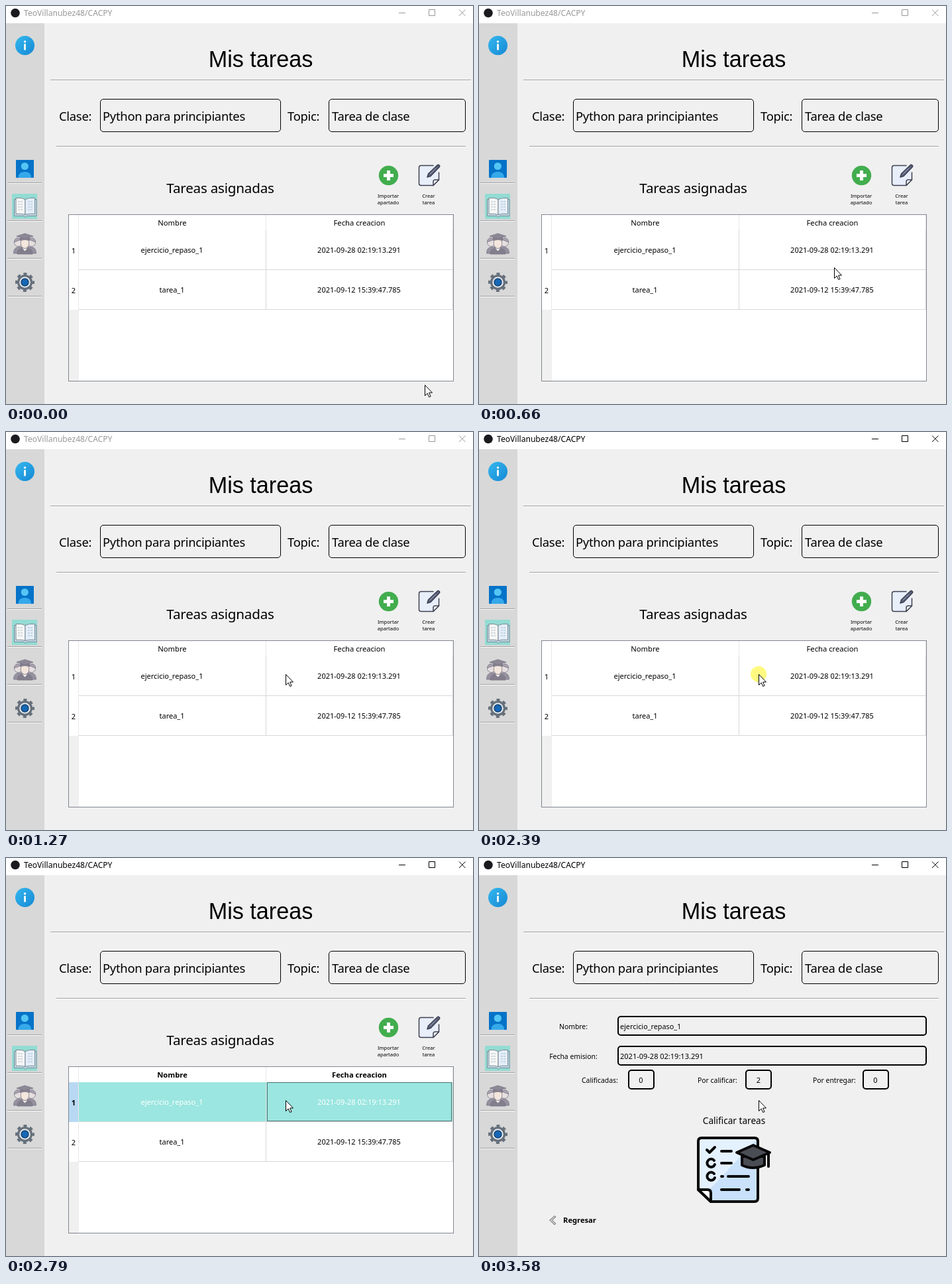
Recreate the animation shown at these times as an HTML page. Size 705 by 600 pixels, loop 8000 ms.

```html
<!DOCTYPE html>
<html lang="es">
<head>
<meta charset="utf-8">
<title>Mis tareas</title>
<style>
  html, body { margin: 0; width: 100%; height: 100%; overflow: hidden; background: #f0f0f0; }
  svg { display: block; width: 100%; height: 100%; }
  text { font: 11px "Noto Sans", "Open Sans", sans-serif; fill: #000; white-space: pre; }
  .mid { text-anchor: middle; }
  #stage .title { font: 34.2px "Liberation Sans", Arial, sans-serif; }
  #stage .field { font-size: 18.4px; letter-spacing: -.015em; }
  #stage .heading { font-size: 20.6px; letter-spacing: -.01em; }
  #stage .tiny { font-size: 7.6px; }
  #stage .label { font-size: 10.4px; }
  #stage .value { font-size: 10.8px; }
  #stage .caption { font-size: 13.6px; }
  #stage .bold { font-weight: 700; font-size: 11.2px; }
  #bar { color: #999; }
  #bar.active { color: #000; }
  #bar text { font-size: 12.1px; fill: currentColor; }
  #table .head { font-size: 11.2px; }
  #table.selected .head { font-weight: 700; }
  #table.selected .row1 { fill: #fff; }
  #table:not(.selected) .selection { display: none; }
  .line { fill: none; stroke: #000; }
  .ink { stroke: #3e4152; stroke-width: 1.5; stroke-linejoin: round; stroke-linecap: round; }
  .thick { stroke: #080808; stroke-width: 4; stroke-linejoin: round; stroke-linecap: round; }
</style>
</head>
<body>
<svg id="stage" viewBox="0 0 705 600">
  <defs>
    <linearGradient id="sky" x2="1" y2="1"><stop stop-color="#35b8ee"/><stop offset="1" stop-color="#1688d4"/></linearGradient>
    <linearGradient id="paper" x2="1" y2="1"><stop offset=".5" stop-color="#e4f1ff"/><stop offset=".5" stop-color="#c9e1fa"/></linearGradient>
    <!-- Sunken separators: a dark line with a light one below -->
    <path id="rules" d="M2 266.5h52M2 323.5h52M2 380.5h52M2 437.5h52M67 111.5h635M76 211.5h618"/>
  </defs>

  <rect width="705" height="600" fill="#f0f0f0"/>
  <rect width="705" height="26" fill="#fff"/>
  <rect y="26" width="58" height="574" fill="#d8d8d8"/>
  <use href="#rules" y="1" stroke="#fff"/>
  <use href="#rules" stroke="#a0a0a0"/>

  <g id="bar">
    <circle cx="14" cy="10.5" r="6.8" fill="#1b1b1f"/>
    <text x="27" y="15">TeoVillanubez48/CACPY</text>
    <path d="M593 10.5h10M638.5 5.5h9v9h-9zM684 5.5l9.5 9.5M693.5 5.5l-9.5 9.5" fill="none" stroke="currentColor"/>
  </g>

  <!-- Sidebar -->
  <circle cx="28.5" cy="59.5" r="14.5" fill="url(#sky)"/>
  <circle cx="28.5" cy="53.7" r="1.7" fill="#fff"/>
  <rect x="27.1" y="57" width="2.8" height="9.5" rx="1" fill="#fff"/>

  <rect x="15" y="232" width="27" height="27" rx="1" fill="#0673c8"/>
  <circle cx="28.3" cy="241.5" r="5.6" fill="#55c5f4"/>
  <path d="M18.5 259c0-6 3.5-9 9.8-9s9.8 3 9.8 9z" fill="#35a9ea"/>

  <rect x="9" y="283" width="38" height="38" fill="#93dcd3"/>
  <g stroke="#6f808c" stroke-width=".9">
    <path d="M12.5 291.5h33.5v25h-14.5l-2.3 2-2.3-2h-14.4z" fill="#c3d9e6"/>
    <path d="M15 289.5q9-1 14 2v23q-6-2-14-1z" fill="#f6f7f6"/>
    <path d="M43.500 289.5q-9-1-14.500 2v23q6-2 14.500-1z" fill="#e3eefa"/>
    <path d="M18 295h7M18 299h7M18 303h7M18 307h7M33 295h7M33 299h7M33 303h7M33 307h7" fill="none" stroke="#a9b8c4" stroke-dasharray="3 1"/>
  </g>

  <g stroke="#7c7688" stroke-width=".8">
    <path d="M11.5 373c0-7 3-9 8-10h18c5 1 8 3 8 10z" fill="#96919f"/>
    <circle cx="18.5" cy="356.5" r="6" fill="#e6dfdf"/>
    <circle cx="38.5" cy="356.5" r="6" fill="#e6dfdf"/>
    <path d="M12.5 356q0-6 6-6.500l3 3zM44.500 356q0-6-6-6.500l-3 3z" fill="#aaa3b0"/>
    <path d="M17 374c0-7 4-9 11.5-9s11.5 2 11.5 9z" fill="#837e8c"/>
    <path d="M24 365l4.5 5 4.5-5z" fill="#f4f1ee"/>
    <ellipse cx="28.5" cy="357.5" rx="6.3" ry="8" fill="#f3e6dc"/>
    <path d="M21.500 353.500v-5h14v5q-7-2.500-14 0z" fill="#837e8c"/>
    <path d="M16 347l12.500-4 12.500 4-12.500 4z" fill="#8d8896"/>
  </g>

  <g transform="translate(28.5 416.5)">
    <circle r="11.7" fill="none" stroke="#66707b" stroke-width="5.6" stroke-dasharray="4.595 4.595" stroke-dashoffset="2.3"/>
    <circle r="11.5" fill="#66707b"/>
    <circle r="8.3" fill="#e6ebf0"/>
    <circle r="5.5" fill="#1767b5" stroke="#12406f" stroke-width="1.4"/>
  </g>

  <!-- Page header -->
  <text class="title mid" x="384.5" y="92">Mis tareas</text>
  <rect class="line" x="142.5" y="140.5" width="272" height="49" rx="4.5"/>
  <rect class="line" x="487.5" y="140.5" width="206" height="49" rx="4.5"/>
  <text class="field" x="80" y="173">Clase:</text>
  <text class="field" x="146" y="173">Python para principiantes</text>
  <text class="field" x="425" y="173">Topic:</text>
  <text class="field" x="492" y="173">Tarea de clase</text>

  <!-- Task list -->
  <g id="list">
    <text class="heading mid" x="323.5" y="282">Tareas asignadas</text>
    <circle cx="577.5" cy="255.5" r="14.7" fill="#42ad4e"/>
    <path d="M570 255.5h15M577.5 248v15" stroke="#fff" stroke-width="5"/>
    <text class="tiny mid" x="577" y="289">Importar</text>
    <text class="tiny mid" x="577" y="299">apartado</text>

    <path class="ink" d="M645 240.500h-18.500q-3 0-3 3v24q0 3 3 3h18.500l8.500-8.500v-11" fill="#e9eefb"/>
    <path class="ink" d="M645 270.500v-5.500q0-3 3-3h5.500z" fill="#fff"/>
    <path class="ink" d="M636 258l1.500-5 13.500-13q1.500-1.500 3 0t0 3l-13 13.500z" fill="#5c627a"/>
    <path d="M640 253.500l9-9" stroke="#a9b4d0"/>
    <text class="tiny mid" x="638" y="289">Crear</text>
    <text class="tiny mid" x="638" y="299">tarea</text>

    <g id="table">
      <rect x="94.5" y="314.5" width="581" height="251" fill="#fff" stroke="#828790"/>
      <rect x="95" y="458" width="15" height="107" fill="#f0f0f0"/>
      <g class="selection">
        <rect x="95" y="338" width="14" height="60" fill="#b9d9f3"/>
        <rect x="110" y="338" width="564" height="59" fill="#9be6e0"/>
      </g>
      <path d="M109.5 315v143M392.5 315v23M674.5 315v23" stroke="#e8e8e8"/>
      <path d="M392.5 338v120M674.5 338v120M110 397.5h565M110 457.5h565" stroke="#d8d8d8"/>
      <rect class="selection line" x="394.5" y="338.5" width="278" height="58" stroke-dasharray="1 1"/>
      <text class="head mid" x="251" y="331">Nombre</text>
      <text class="head mid" x="533.5" y="331">Fecha creacion</text>
      <text class="head mid" x="102" y="373">1</text>
      <text class="mid" x="102" y="433">2</text>
      <text class="row1 mid" x="250.5" y="372">ejercicio_repaso_1</text>
      <text class="row1 mid" x="533" y="372">2021-09-28 02:19:13.291</text>
      <text class="mid" x="250.5" y="432">tarea_1</text>
      <text class="mid" x="533" y="432">2021-09-12 15:39:47.785</text>
    </g>
  </g>

  <!-- Task detail -->
  <g id="detail">
    <g class="line" stroke-width="2">
      <rect x="210" y="239" width="465" height="28" rx="4"/>
      <rect x="210" y="284" width="465" height="28" rx="4"/>
      <rect x="226" y="320" width="38" height="28" rx="4"/>
      <rect x="403" y="320" width="38" height="28" rx="4"/>
      <rect x="580" y="320" width="38" height="28" rx="4"/>
    </g>
    <text class="label mid" x="142.5" y="258">Nombre:</text>
    <text class="label mid" x="142.5" y="303">Fecha emision:</text>
    <text class="value" x="213" y="258">ejercicio_repaso_1</text>
    <text x="213" y="303">2021-09-28 02:19:13.291</text>
    <text class="label" x="155" y="339">Calificadas:</text>
    <text class="label" x="330" y="339">Por calificar:</text>
    <text class="label" x="504" y="339">Por entregar:</text>
    <text class="mid" x="244.5" y="339">0</text>
    <text class="mid" x="422" y="339">2</text>
    <text class="mid" x="598.5" y="339">0</text>
    <text class="caption mid" x="385" y="401">Calificar tareas</text>

    <path class="thick" d="M336 422h80q5 0 5 5v86q0 5-5 5h-66l-19-18v-73q0-5 5-5z" fill="url(#paper)"/>
    <path class="thick" d="M331 500h14q5 0 5 5v13z" fill="#fff"/>
    <path class="thick" d="M344 440l4 4 8-8M366 442h15M366 460h15M366 480h2M376 480h31M366 500h27M404 500h3" fill="none"/>
    <path class="thick" d="M355 456a6 6 0 1 0 1 6M355 476a6 6 0 1 0 1 6" fill="none"/>
    <path class="thick" d="M397 450v13q16 8 34 0v-13z" fill="#4b4d55"/>
    <path class="thick" d="M389 444l25-11 25 11-25 11z" fill="#4b4d55"/>
    <path class="thick" d="M437 446v19"/>

    <rect id="frame" x="94.5" y="526.5" width="119" height="39" fill="none" stroke="#d5d5d5"/>
    <path d="M114 539.5l2 1.5-5.5 5 5.5 5-2 2-7.5-7z" fill="#c5c5c5" stroke="#777"/>
    <text class="bold" x="127" y="550">Regresar</text>
  </g>

  <circle id="click" cx="422" cy="365" r="12" fill="#fff600" fill-opacity=".5"/>
  <path id="pointer" d="M.5.5v16l3.7-3.5 2.5 5.5 2.4-1-2.5-5.500h4.900z" fill="#fff" stroke="#000"/>
</svg>
<script>
  const LOOP = 8000;
  const flick = [[0, 632, 571], [200, 598, 507], [260, 558, 430], [330, 539, 396]];
  const glide = { start: 660, end: 1270, steps: 9, from: [536, 394], to: [422, 365] };
  const el = id => document.getElementById(id);
  const show = (id, on) => el(id).style.display = on ? "" : "none";
  const within = (t, a, b) => t >= a && t < b;

  function pointerAt(t) {
    if (t < glide.start) return flick.findLast(([time]) => t >= time).slice(1);
    // The pointer advances in discrete steps, about 15 per second.
    const step = (glide.end - glide.start) / glide.steps;
    const p = Math.min(1, Math.floor((t - glide.start) / step + 1e-6) / glide.steps);
    const eased = p * p * (3 - 2 * p);
    return glide.from.map((v, i) => Math.round(v + (glide.to[i] - v) * eased));
  }

  function render(t) {
    el("pointer").setAttribute("transform", `translate(${pointerAt(t)})`);
    el("bar").classList.toggle("active", t >= 2390);
    el("table").classList.toggle("selected", t >= 2460);
    show("click", within(t, 2390, 2520) || within(t, 2660, 2790));
    show("list", t < 3380);
    show("detail", t >= 3380);
    show("frame", t < 3580);
  }

  const begin = performance.now();
  function tick() {
    render((performance.now() - begin) % LOOP);
    requestAnimationFrame(tick);
  }
  tick();
</script>
</body>
</html>
```
